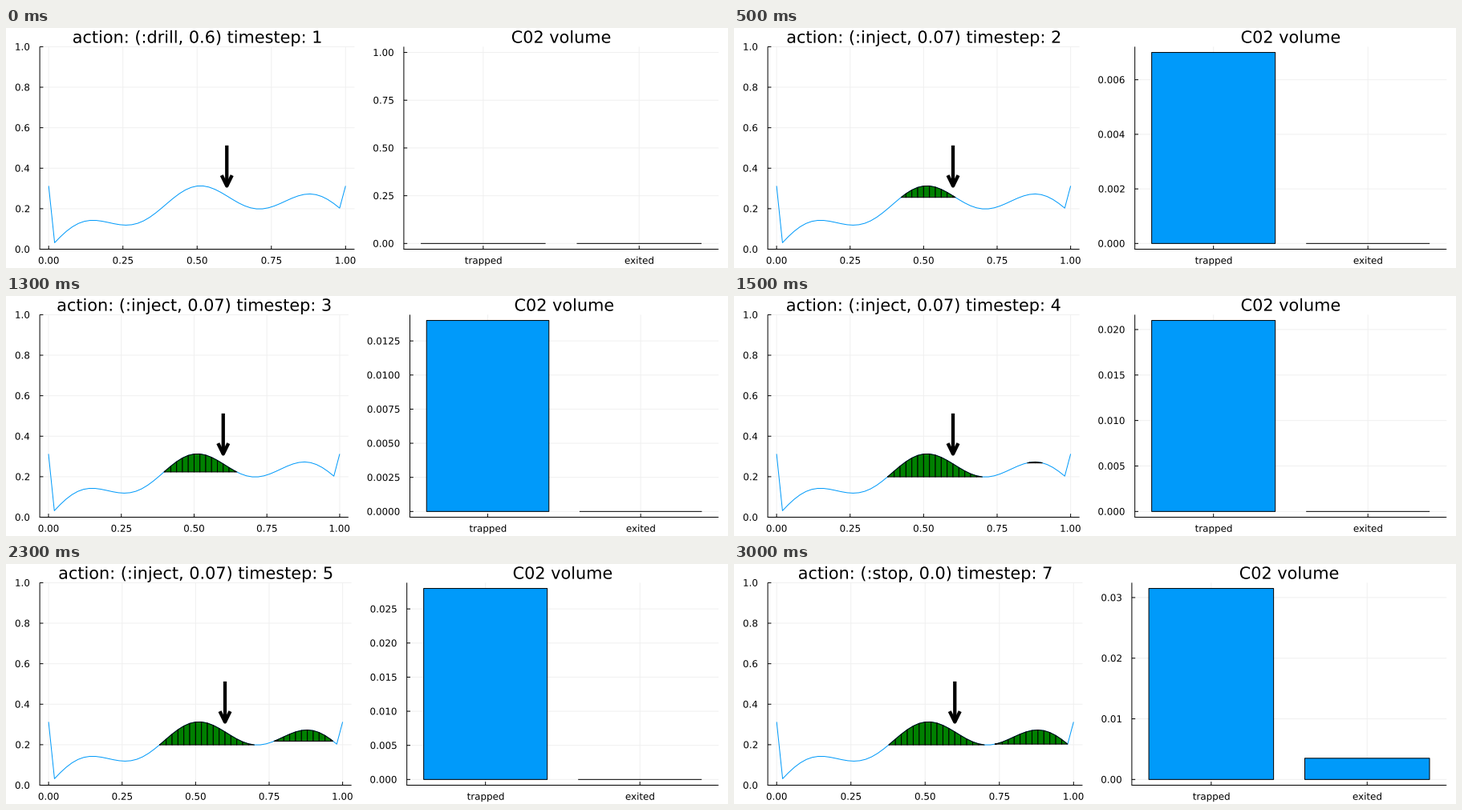
Animation of 900 by 300 pixels, one loop 3500 ms. Source, as a matplotlib script:

```python
import numpy as np
import matplotlib.pyplot as plt
from matplotlib.animation import FuncAnimation
from matplotlib.patches import PathPatch, Polygon
from matplotlib.textpath import TextPath
from matplotlib.transforms import Affine2D

WIDTH, HEIGHT, DPI = 900, 300, 100
PT = 72 / DPI  # points per pixel
BLUE, GREEN, GRID = "#009AFA", "#008000", "#f0f0f0"
TOP, BOTTOM, LEFT, RIGHT = 23.4, 276.5, 42.1, 888.2
TITLE_PX, TICK_PX = 20.8, 11.9

plt.rcParams["font.family"] = "DejaVu Sans"

# surface profile with closed ends
xs = np.linspace(0, 1, 51)
hs = 0.0585 * np.sin(5 * np.pi * xs) + 0.1645 * np.sin(np.pi * xs) + 0.178 * xs
hs[[0, -1]] = hs.max()

MAIN, SIDE = (0.3, 0.71), (0.71, 0.985)

# action, main level, side level, trapped, exited, tick step, tick decimals
STEPS = [
    ("(:drill, 0.6)", None, None, 0, 0, 0.25, 2),
    ("(:inject, 0.07)", 0.256, None, 0.007, 0, 0.002, 3),
    ("(:inject, 0.07)", 0.2235, None, 0.014, 0, 0.0025, 4),
    ("(:inject, 0.07)", 0.1993, 0.268, 0.021, 0, 0.005, 3),
    ("(:inject, 0.07)", 0.1993, 0.2175, 0.028, 0, 0.005, 3),
    ("(:inject, 0.07)", 0.1993, 0.203, 0.0315, 0.0035, 0.01, 2),
    ("(:stop, 0.0)", 0.1993, 0.203, 0.0315, 0.0035, 0.01, 2),
]

fig = plt.figure(figsize=(WIDTH / DPI, HEIGHT / DPI), dpi=DPI, facecolor="white")
ax = fig.add_axes([0, 0, 1, 1])


def line(x, y, px=1.0, color="black", z=4, **kw):
    ax.plot(x, y, color=color, lw=px * PT, zorder=z, snap=False,
            solid_capstyle="butt", **kw)


def label(x, y, text, px, ha="center"):
    """Text as outlines, so that it can sit between whole pixels."""
    path = TextPath((0, 0), text, size=px)
    box = path.get_extents()
    anchor = box.x1 if ha == "right" else (box.x0 + box.x1) / 2
    place = Affine2D().translate(-anchor, 0).scale(1, -1).translate(x, y)
    ax.add_patch(PathPatch(place.transform_path(path), fc="black", lw=0,
                           zorder=6, snap=False))


def shape(points, color):
    ax.add_patch(Polygon(points, closed=True, fc=color, ec="black", lw=PT,
                         joinstyle="round", zorder=3, snap=False))


def panel(x0, x1, title, xticks, yticks):
    """Grid, axes, ticks and labels; ticks are (pixel, text) pairs."""
    for x, text in xticks:
        line([x, x], [TOP, BOTTOM], color=GRID, z=1)
        line([x, x], [BOTTOM, BOTTOM - 4.3])
        label(x, 294.7, text, TICK_PX)
    for y, text in yticks:
        line([x0, x1], [y, y], color=GRID, z=1)
        line([x0, x0 + 4.3], [y, y])
        label(x0 - 13, y + 4.35, text, TICK_PX, "right")
    line([x0, x0], [TOP, BOTTOM + 0.5])
    line([x0, x1], [BOTTOM, BOTTOM])
    label((x0 + x1) / 2, 18.6, title, TITLE_PX)


def lobe(level, window, px, py):
    """Fill between the surface and a flat level, one strip per cell."""
    inside = np.flatnonzero((xs > window[0]) & (xs < window[1]) & (hs > level))
    a, b = inside[0], inside[-1]
    lo = np.interp(level, hs[[a - 1, a]], xs[[a - 1, a]])
    hi = np.interp(level, hs[[b + 1, b]], xs[[b + 1, b]])
    gx = px(np.r_[lo, xs[inside], hi])
    gy = py(np.r_[level, hs[inside], level])
    base = py(level)
    for i in range(len(gx) - 1):
        shape([(gx[i], base), (gx[i], gy[i]),
               (gx[i + 1], gy[i + 1]), (gx[i + 1], base)], GREEN)


def draw_surface(x1, title, main, side):
    def px(x):
        return LEFT + (x1 - LEFT) * (x + 0.03) / 1.06

    def py(h):
        return BOTTOM - (BOTTOM - TOP) * h

    panel(LEFT, x1, title,
          [(px(v), f"{v:.2f}") for v in np.linspace(0, 1, 5)],
          [(py(v), f"{v:.1f}") for v in np.linspace(0, 1, 6)])
    line(px(xs), py(hs), 1.0, BLUE, z=2)
    for level, window in ((main, MAIN), (side, SIDE)):
        if level is not None:
            lobe(level, window, px, py)

    # well arrow
    x, tip = px(0.6), py(hs.max())
    line([x, x], [py(hs.max() + 0.2), tip], 4.3, z=5)
    line([x - 6.5, x, x + 6.5], [tip - 13.3, tip, tip - 13.3], 4.3, z=5,
         solid_joinstyle="round")


def draw_volume(x0, trapped, exited, step, decimals):
    unit = (RIGHT - x0) / 2.018
    peak = trapped or 1

    def py(v):
        return BOTTOM - (BOTTOM - TOP) * (v / peak + 0.03) / 1.06

    centres = [x0 + unit * 0.509, x0 + unit * 1.509]
    ticks = np.arange(0, peak * 1.0001, step)
    panel(x0, RIGHT, "C02 volume",
          list(zip(centres, ("trapped", "exited"))),
          [(py(v), f"{v:.{decimals}f}") for v in ticks])
    base = py(0)
    for c, v in zip(centres, (trapped, exited)):
        l, r, top = c - 0.4 * unit, c + 0.4 * unit, py(v)
        if v:
            shape([(l, base), (l, top), (r, top), (r, base)], BLUE)
        else:
            line([l, r], [base, base])


def draw(i):
    ax.clear()
    ax.set(xlim=(0, WIDTH), ylim=(HEIGHT, 0))
    ax.axis("off")
    action, main, side, trapped, exited, step, decimals = STEPS[i]
    # longer tick labels narrow both panels equally
    shift = 3.78 * (decimals - 2)
    draw_surface(434.4 - shift, f"action: {action} timestep: {i + 1}", main, side)
    draw_volume(495.9 + shift, trapped, exited, step, decimals)
    return []


anim = FuncAnimation(fig, draw, frames=len(STEPS), interval=500,
                     repeat=True, repeat_delay=0, blit=False)
plt.show()
```
